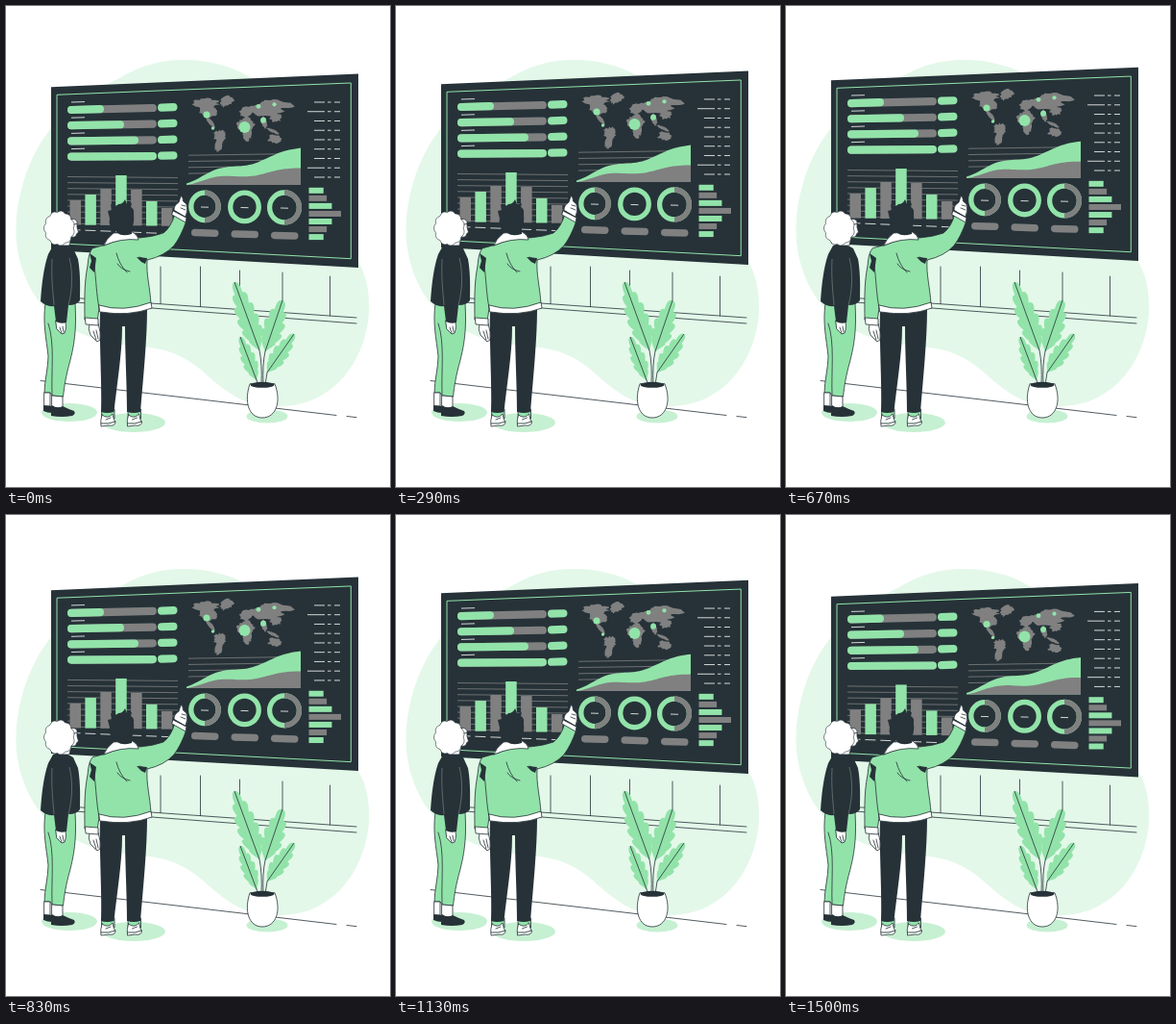
An HTML page for the animation above (1540 ms loop, 400 by 500 pixels).

```html
<!DOCTYPE html>
<html lang="en">
<head>
<meta charset="utf-8">
<style>
  html, body { margin: 0; width: 100%; height: 100%; overflow: hidden; background: #fff; }
  svg { display: block; width: 100vw; height: 100vh; }
  .dark { fill: #263238; }
  .green { fill: #92e3a9; }
  .white { fill: #fff; }
  .ink { stroke: #263238; stroke-width: .8; stroke-linejoin: round; stroke-linecap: round; }
  .line { fill: none; }
</style>
</head>
<body>
<svg viewBox="0 0 400 500">
  <path fill="#e3f8e9" d="M185 56C210 56 234 62 252 73C300 105 340 190 364 262C375 276 379 296 378 320C374 368 343 413 290 416C252 418 234 405 212 386C190 365 170 356 140 354C100 351 60 340 35 308C16 283 8 250 11 220C14 185 28 150 47 127C70 100 85 92 118 75C140 62 160 56 185 56Z"/>
  <g fill="#c6f0d2">
    <ellipse cx="66" cy="422.5" rx="29" ry="9.5"/>
    <ellipse cx="133" cy="433" rx="33" ry="10"/>
    <ellipse cx="272" cy="426.5" rx="21.5" ry="7"/>
  </g>
  <path class="ink line" d="M36 389.5L344 425.5M355 426.5L365 427.6M72 303.5L365 324M72 308L365 330M161 271V309.5M202.5 271V312.5M243.5 275V315.3M288 277V318.5M337.5 281V322"/>

  <g id="board"></g>

  <g id="woman">
    <path class="green ink" d="M41 309H72C73 328 73 345 67 368C62 386 61 394 59.5 406L48 405L46 402H40C40 390 44 376 44 364C42 345 38 330 41 309Z"/>
    <path class="ink line" d="M44 330C51 350 47 380 48 404"/>
    <path class="white ink" d="M40 402H46V416H40ZM48 405L59 406V418H48Z"/>
    <path class="dark" d="M39 415L48 416V423Q43 423 39 421ZM48 415Q53 419 59 416Q65 419 71 421Q73 424 69 426Q58 428 47 426Q46 420 48 415Z"/>
    <path class="white ink" d="M52 327H61Q64 332 61 340L58 341L53 336ZM56 334L58 340M59 333L60 339"/>
    <path class="dark" d="M49 249Q59 245 70 252L75 263C78 280 77 296 77 306Q74 311 65 311L63 329Q57 331 52 328L50 312Q42 313 36 307C37 292 39 272 44 258Z"/>
    <path class="line" stroke="#819087" stroke-width=".6" d="M48 263C47 283 49 298 50 311M66 262C70 278 69 296 65 311"/>
    <path class="white ink" d="M62 222Q73 220 74 224V230L75.500 235L73.500 237Q73 241 68 240L66 249H57Z"/>
    <path id="curls" class="white" stroke="#263238" stroke-width=".6"/>
    <path class="ink line" d="M71 227L73.500 226.500"/>
  </g>

  <g id="man">
    <g id="foot">
      <path class="green ink" d="M100 419H113V429H100Z"/>
      <path class="white ink" d="M100 425Q106 430 111 424Q112 430 114 433Q113 437 107 436L99 437Q98 431 100 425ZM99 434Q107 435 114 432M104 430L109 428"/>
    </g>
    <use href="#foot" x="27.5"/>
    <path class="dark" d="M98 315H147C147 346 143 386 140 422Q133 424 126 422C126 394 124 362 124 333H121C121 362 115 397 112.500 422Q105 424 99 422C100 392 97 350 98 315Z"/>
    <path class="white ink" d="M87 330H96Q99 339 98 347L95 349L88 342Q85 336 87 330ZM91 338L94 347M94 337L96 346"/>
    <path class="green ink" d="M90 252Q86 256 85 270C81 290 82 309 82 326L95 328L97 314Q121 320 151 310C150 292 146 280 147 264Q165 260 175 249Q182 240 188 223L176 216Q172 230 164 236Q153 240 139 241Q127 238 104 248Z"/>
    <path class="ink line" d="M92 269C94 286 94 298 97 314M147 264L139 261M115 257Q118 269 126 277M116 268Q120 274 129 276"/>
    <path class="dark" d="M87 257L94 262L92 277L87 272L89 265ZM136 261L147 262L145 268L141 266Z"/>
    <path class="white ink" d="M97 311Q122 319 151 308L152 314Q128 323 98 318ZM82.500 324L96 325V332L83.500 331ZM174 213L188 220L187 225L173 217ZM175 212Q175 207 180 204L182 198Q184 197 184.500 203L188 206Q190 212 187 219ZM183 207L187 208M182 210L187 212M102 249Q104 242 112 236L132 235Q138 239 138 243Q120 241 102 249Z"/>
    <path class="dark" d="M106 213L110 212L109 206Q115 209 117 206Q122 206 124 201L126 206L131 205L130 209Q134 211 133 216Q134 226 131 231V237Q121 240 116 236L113 232Q106 229 108 221Z"/>
  </g>

  <g id="plant"></g>
</svg>

<script>
const PERIOD = 1540, LEAD = 62, RISE = 8;
const GREEN = '#92e3a9', GREY = '#808080', DARK = '#263238', WHITE = '#fff';
const board = document.getElementById('board');

const repeat = (n, draw) => Array.from({ length: n }, (_, i) => draw(i)).join('');
const line = (x1, y1, x2, y2, color, width = .8, cap = 'butt') =>
  `<path d="M${x1} ${y1}L${x2} ${y2}" stroke="${color}" stroke-width="${width}" stroke-linecap="${cap}"/>`;
const pill = (x1, y1, x2, y2, color, size) =>
  line(x1 + size / 2, y1, x2 - size / 2, y2, color, size, 'round');
const poly = (points, fill, stroke = 'none') =>
  `<polygon points="${points}" fill="${fill}" stroke="${stroke}"/>`;
const rect = (x, y, w, h, fill) =>
  `<rect x="${x}" y="${y}" width="${w}" height="${h}" fill="${fill}"/>`;

let seed = 7;
const random = () => (seed = seed * 16807 % 2147483647) / 2147483647;

function progressBars() {
  return [102, 123, 138, 157].map((end, i) => {
    const left = 108 + 16.2 * i, right = left - 2 + .5 * i;
    const y = left + (right - left) * (end - 64) / 93;
    return line(68, left - 8, 82, left - 8.4, WHITE) +
      pill(64, left, 157, right, GREY, 8.2) + pill(64, left, end, y, GREEN, 8.2) +
      pill(158, right - .4, 178.5, right - .8, GREEN, 8.2);
  }).join('');
}

function barChart() {
  return repeat(9, i => line(64, 177.5 + i * 6.1, 179, 178.5 + i * 6.1, GREY)) +
    [202, 196, 190, 176, 191, 203, 210].map((top, i) => {
      const x = 66.5 + i * 15.9, base = 232.5 + i * .65;
      return rect(x, top, 11.5, 227.5 + i * .2 - top, i % 2 ? GREEN : GREY) +
        line(x, base, x + 11, base + .4, WHITE);
    }).join('');
}

// An ellipse with a ragged coast.
function land(x, y, rx, ry, tilt = 0) {
  const points = repeat(26, i => {
    const a = i / 26 * 2 * Math.PI, r = .75 + random() * .4;
    return `${(rx * r * Math.cos(a)).toFixed(1)} ${(ry * r * Math.sin(a)).toFixed(1)} `;
  });
  return `<g transform="translate(${x} ${y}) rotate(${tilt})">${poly(points, GREY)}</g>`;
}

function worldMap() {
  const spot = (x, y, r) => `<circle cx="${x}" cy="${y}" r="${r}" fill="${GREEN}"/>`;
  return land(208, 101, 14, 5) + land(211, 109, 9, 7) + land(213, 121, 7, 2.2, 50) + land(230, 99, 8, 5, -30) +
    land(223, 135, 7, 6) + land(222, 142, 11, 4, 100) +
    land(250, 123, 9, 7) + land(251, 132, 9, 4.5, 90) +
    land(251, 110, 8, 6, -30) + land(272, 107, 17, 9) + land(284, 102, 15, 4, 8) +
    land(269, 121, 6, 3, 80) + land(281, 116, 6, 5) + land(278, 130, 7, 1.8, 25) + land(280, 138, 7, 4.5) +
    spot(209, 113, 3.5) + spot(215.5, 127, 1.7) + spot(248.5, 126, 6) +
    spot(263, 104.3, 2.4) + spot(279.5, 102.3, 2.1) + spot(268, 118.7, 3);
}

function areaChart() {
  const wave = (start, rise, swell, fill) => poly(repeat(41, i => {
    const u = i / 40;
    const y = start - rise * u - (swell - swell / 2 * u) * Math.sin(Math.PI * u / .58) ** 2;
    return `${188 + 119 * u} ${y.toFixed(1)} `;
  }) + '307 186 188 186', fill);
  return repeat(4, i => line(190, 155.2 + i * 6.3, 306, 153.5 + i * 6.3, GREY)) +
    wave(184.5, 35, 6.5, GREEN) + wave(186, 16, 5, GREY);
}

function donuts() {
  return repeat(3, i => {
    const x = 207 + 41.5 * i, y = 208.4 + .5 * i, r = 14.2 + .6 * i;
    const ring = `<circle cx="${x}" cy="${y}" r="${r}" fill="none" stroke="${GREEN}" stroke-width="5.3"/>`;
    const half = `<path d="M${x} ${y - r}A${r} ${r} 0 0 1 ${x} ${y + r}" fill="none" stroke="${GREY}" stroke-width="5.3"/>`;
    return ring + (i === 1 ? '' : half) + line(x - 4, y + .6, x + 4, y + .8, WHITE) +
      pill(x - 14, 235.6 + i * 1.4, x + 14.5, 236.2 + i * 1.4, GREY, 7.5);
  });
}

function sideColumn() {
  return repeat(9, i => {
    const y = 100 + i * 9.75, start = i % 6 === 1 ? 314 : 321;
    return line(start, y, 332, y, WHITE) + line(335, y, 338.5, y, WHITE) + line(342, y, 348, y, WHITE);
  }) + repeat(7, i =>
    rect(315.5, 188.8 + i * 8.05, 33.5 / (1 + .4 * Math.abs(i - 3)), 6, i % 2 ? GREY : GREEN));
}

board.innerHTML =
  poly('47 84.3 367 70.6 367 272 47 254', DARK) +
  poly('53 92.3 359.3 80 359.3 262.7 53 246.7', 'none', GREEN) +
  progressBars() + barChart() + worldMap() + areaChart() + donuts() + sideColumn();

// Scalloped outline of the curly hair.
function curls(cx, cy, rx, ry, lobes) {
  const at = (i, k) => {
    const a = i / lobes * 2 * Math.PI;
    return `${(cx + rx * k * Math.cos(a)).toFixed(1)} ${(cy + ry * k * Math.sin(a)).toFixed(1)}`;
  };
  return `M${at(0, .95)}` + repeat(lobes, i => `Q${at(i + .5, 1.16)} ${at(i + 1, .95)}`) + 'Z';
}
document.getElementById('curls').setAttribute('d', curls(55.5, 231, 15.5, 17.5, 11));

// A lobed leaf between base and tip, with a midrib.
function leaf(x0, y0, x1, y1, width, lobes) {
  const dx = x1 - x0, dy = y1 - y0, len = Math.hypot(dx, dy);
  const at = (u, side) =>
    `${(x0 + dx * u - dy / len * side).toFixed(1)} ${(y0 + dy * u + dx / len * side).toFixed(1)}`;
  const girth = u => width * Math.sin(Math.PI * u ** .75) ** .7;
  const edge = side => `M${at(0, 0)}` + repeat(lobes, i => {
    const u = (i + 1) / lobes;
    return `Q${at(u, side * girth(u - .5 / lobes) * 1.35)} ${at(u, i < lobes - 1 ? side * girth(u) * .7 : 0)}`;
  }) + 'Z';
  return `<path class="green" d="${edge(1)}${edge(-1)}"/>` + line(x0, y0, x1, y1, DARK);
}

document.getElementById('plant').innerHTML =
  leaf(264, 358, 238, 287, 11.5, 6) + leaf(270, 359, 288, 306, 11.5, 5) +
  leaf(261, 389, 244, 344, 8, 5) + leaf(272, 381, 300, 341, 9, 5) +
  `<path class="ink line" d="M264 358Q267 372 266 394M270 359Q267 372 268 394M261 389L263 394M272 381L270 394"/>
   <path class="white ink" d="M254 393C248 410 252 428 267 428C282 428 287 410 280 393Z"/>
   <ellipse class="dark" cx="267" cy="393.8" rx="12.5" ry="3"/>`;

function frame(now) {
  const phase = (now + LEAD) / PERIOD % 1;
  const y = .65 - RISE * (1 - Math.abs(2 * phase - 1));
  board.setAttribute('transform', `translate(0 ${y.toFixed(3)})`);
  requestAnimationFrame(frame);
}
frame(performance.now());
</script>
</body>
</html>
```
